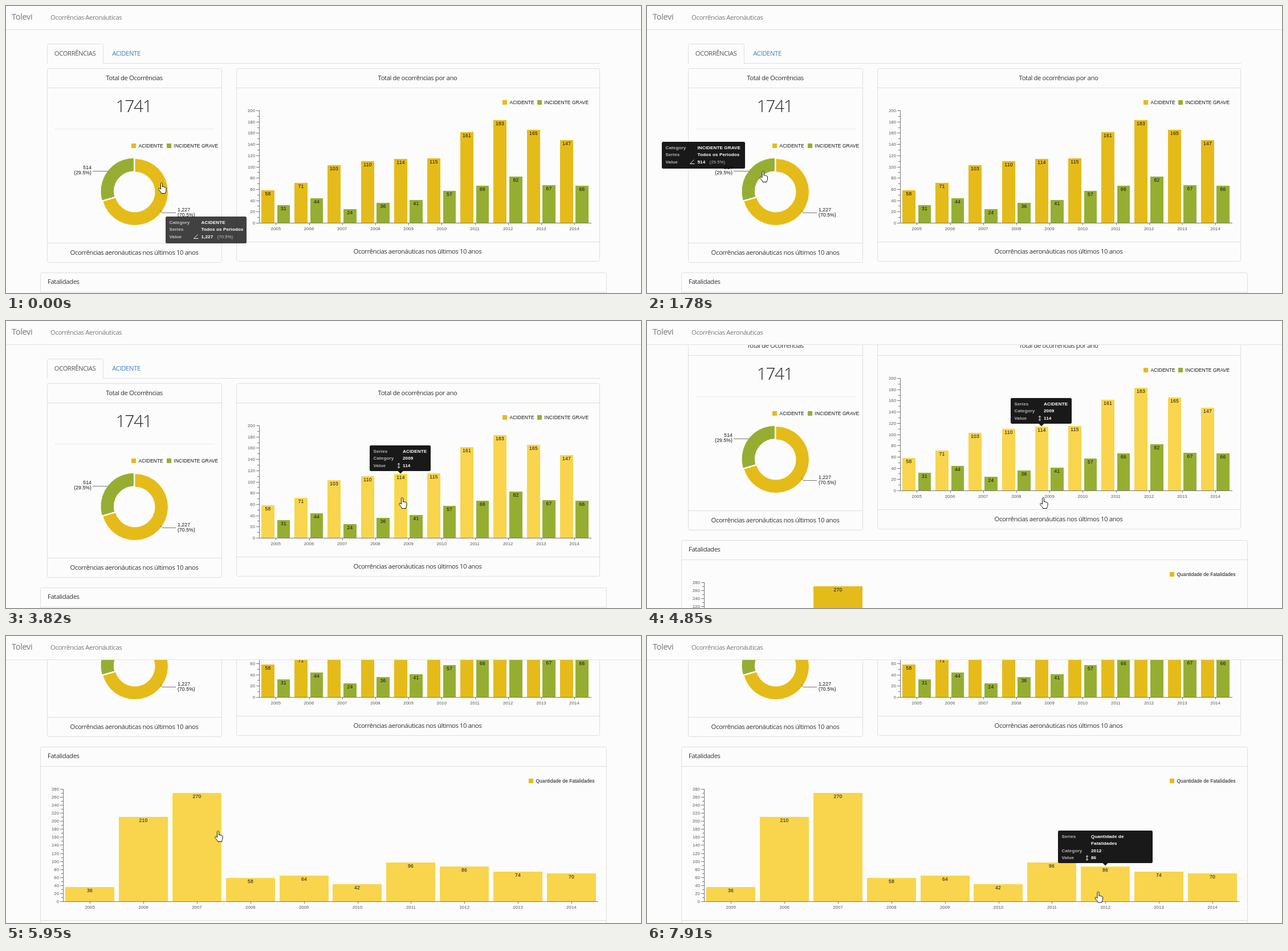
An HTML page with a canvas that plays this animation: 1114 by 503 pixels, repeating every 8 s.

```html
<!DOCTYPE html>
<html lang="pt">
<head>
<meta charset="utf-8">
<style>
html, body { margin: 0; width: 100%; height: 100%; overflow: hidden; background: #fcfcfc; }
canvas { display: block; }
</style>
</head>
<body>
<canvas id="stage" width="1114" height="503"></canvas>
<script>
const stage = document.getElementById('stage').getContext('2d');
const layer = new OffscreenCanvas(180, 70).getContext('2d');
let g = stage; // context the drawing helpers use

const LOOP = 8000, STEP = 120;
const UI = '"Open Sans", sans-serif', ARIAL = '"Liberation Sans", sans-serif';
const YELLOW = '#e5bb19', LIGHT = '#f8d54c', GREEN = '#95ae32', LINE = '#dedede', AXIS = '#777';
const TOP = -Math.PI / 2, SPLIT = TOP + Math.PI * 2 * .705;

const accidents = { left: 448, step: 58.2, width: 23, bottom: 380, scale: .985,
  values: [58, 71, 103, 110, 114, 115, 161, 183, 165, 147] };
const incidents = { ...accidents, left: 475.6, width: 22.6,
  values: [31, 44, 24, 36, 41, 57, 66, 82, 67, 66] };
const deaths = { left: 104.2, step: 93.85, width: 86, bottom: 738, scale: .7036,
  values: [36, 210, 270, 58, 64, 42, 96, 86, 74, 70] };

// Mouse moves: start time, number of steps, end point
const moves = [
  [1030, 4, 203.5, 289.5], [2680, 4, 707.5, 305], [3670, 2, 695, 309.5],
  [5690, 4, 350.5, 343.5], [7080, 1, 363, 350], [7230, 3, 791.5, 448]
];

// Progress 0..1 in hard steps, as in a screen capture
const steps = (t, start, n) => Math.min(n, Math.max(0, Math.floor((t - start) / STEP) + 1)) / n;
const easeOut = p => 1 - (1 - p) ** 2;
const mix = (a, b, p) => a + (b - a) * p;

const scrollAt = t => Math.round(273 * steps(t, 4850, 3) ** 1.084);

function mouseAt(t) {
  let x = 273, y = 309.5;
  for (const [start, n, toX, toY] of moves) {
    const p = easeOut(steps(t, start, n));
    x = mix(x, toX, p);
    y = mix(y, toY, p);
  }
  return [x, y];
}

function barRect({ values, left, step, width, bottom, scale }, i) {
  const x = Math.round(left + step * i), y = Math.round(bottom - values[i] * scale);
  return [x, y, Math.round(left + step * i + width) - x, bottom - y];
}

function isOverShape(x, y) {
  const r = Math.hypot(x - 226, y - 326);
  return r > 35 && r < 58 || [accidents, deaths].some(chart => chart.values.some((_, i) => {
    const [bx, by, w, h] = barRect(chart, i);
    return x >= bx && x <= bx + w && y >= by && y <= by + h;
  }));
}

function text(s, x, y, size, { color = '#111', align = 'left', font = ARIAL, weight = 400, gap = .1 } = {}) {
  g.font = `${weight} ${size}px ${font}`;
  g.letterSpacing = gap + 'px';
  g.fillStyle = color;
  g.textAlign = align;
  g.textBaseline = 'middle';
  g.fillText(s, x, y);
}
const label = (s, x, y, align = 'center', color = '#333') =>
  text(s, x, y, 11.3, { color, align, font: UI, gap: -.4 });

function rect(x, y, w, h, color) {
  g.fillStyle = color;
  g.fillRect(x, y, w, h);
}

function line(color, ...points) {
  g.strokeStyle = color;
  g.beginPath();
  points.forEach(p => g.lineTo(...p));
  g.stroke();
}

function box(x, y, w, h, radius, fill, stroke) {
  g.beginPath();
  g.roundRect(x, y, w, h, radius);
  if (fill) { g.fillStyle = fill; g.fill(); }
  if (stroke) { g.strokeStyle = stroke; g.stroke(); }
}

function panel(x, y, w, h, ...rules) {
  box(x + .5, y + .5, w, h, 3, null, LINE);
  rules.forEach(r => rect(x, r, w, 1, LINE));
}

function legend(name, x, y, color) {
  rect(x, y - 4, 8, 8, color);
  text(name, x + 12.5, y + .5, 8.4);
}

function axes({ values, left, step, width, bottom, scale }, x, right, max, center) {
  const top = Math.round(bottom - max * scale);
  rect(x, top, 1, bottom - top + 1, AXIS);
  rect(x, bottom, right - x, 1, AXIS);
  for (let v = 0; v <= max; v += 10) {
    const y = Math.round(bottom - v * scale), tick = v % 20 ? 3 : 5;
    rect(x - tick, y, tick, 1, AXIS);
    if (v % 20 == 0) text(v, x - 7, y + .5, 7.6, { align: 'right', color: '#555' });
  }
  values.forEach((_, i) => {
    const mid = center + step * i;
    rect(Math.round(mid), bottom, 1, 4, AXIS);
    text(2005 + i, mid, bottom + 10.5, 7.7, { align: 'center', color: '#555' });
  });
}

function bars(chart, color, hover) {
  chart.values.forEach((v, i) => {
    const [x, y, w, h] = barRect(chart, i);
    rect(x, y, w, h, color);
    if (i === hover) {
      g.strokeStyle = '#fae434';
      g.strokeRect(x + .5, y + .5, w - 1, h - 1);
    }
    text(v, x + w / 2, y + 6.3, 8.5, { align: 'center', gap: .25 });
  });
}

function slice(x, y, from, to, color) {
  g.beginPath();
  g.arc(x, y, 58.5, from, to);
  g.arc(x, y, 35, to, from, true);
  g.closePath();
  g.fillStyle = color;
  g.fill();
  g.strokeStyle = '#fff';
  g.stroke();
}

function donut() {
  slice(226, 326, TOP, SPLIT, YELLOW);
  slice(224.4, 324.8, SPLIT, TOP + Math.PI * 2, GREEN);
  line(AXIS, [152, 289.5], [178, 289.5], [181, 292.5]);
  line(AXIS, [270, 358], [274, 362.5], [298, 362.5]);
  text('514', 150, 284, 8.6, { align: 'right' });
  text('(29.5%)', 150, 293, 8.6, { align: 'right' });
  text('1,227', 301, 357.5, 8.6);
  text('(70.5%)', 301, 366.5, 8.6);
}

// Composed on its own layer so that it fades as one piece
function tooltip(x, y, w, h, opacity, rows, { arrow, share, valueX = 58 }) {
  if (opacity <= 0) return;
  g = layer;
  g.clearRect(0, 0, 180, 70);
  box(0, 0, w, h, 2.5, 'rgba(0,0,0,.9)');
  if (arrow) {
    g.beginPath();
    g.moveTo(arrow - 4.5, h);
    g.lineTo(arrow + 4.5, h);
    g.lineTo(arrow, h + 4.5);
    g.fill();
  }
  rows.forEach(([name, value], i) => {
    const rowY = 10.5 + i * 12.5;
    text(name, 6.5, rowY, 8.1, { weight: 700, color: '#b4b4b4' });
    text(value, valueX, rowY, 8.1, { weight: 700, color: '#fff' });
  });
  const iconX = valueX - 7, iconY = rows.length * 12.5 - 2;
  if (share) {
    line('#eee', [iconX + 1, iconY - 4], [iconX - 6, iconY + 3], [iconX + 2, iconY + 3]);
    text(share, g.measureText(rows.at(-1)[1]).width + valueX + 7.5, iconY, 7.6, { color: '#c0c0c0' });
  } else {
    line('#eee', [iconX, iconY - 4], [iconX, iconY + 4]);
    for (const d of [-1, 1])
      line('#eee', [iconX - 2, iconY + 2 * d], [iconX, iconY + 4.3 * d], [iconX + 2, iconY + 2 * d]);
  }
  g = stage;
  g.globalAlpha = opacity;
  g.drawImage(layer.canvas, Math.round(x), Math.round(y));
  g.globalAlpha = 1;
}

function tooltips(t) {
  const toGreen = easeOut(steps(t, 1420, 4)), leave = steps(t, 2680, 4) ** 2;
  const onGreen = t >= 1270 && t < 2680;
  const [name, value, share] = onGreen
    ? ['INCIDENTE GRAVE', '514', '(29.5%)']
    : ['ACIDENTE', '1,227', '(70.5%)'];
  tooltip(mix(mix(280, 26, toGreen), 161, leave), mix(mix(369, 238, toGreen), 307, leave),
    onGreen ? 146 : 142, 47, t < STEP ? .82 : 1 - steps(t, 2680, 5) ** 1.3,
    [['Category', name], ['Series', 'Todos os Periodos'], ['Value', value]], { share, valueX: 62.5 });

  tooltip(638, 218, 107, 45, t < 5260 ? steps(t, 2950, 5) : 0,
    [['Series', 'ACIDENTE'], ['Category', '2009'], ['Value', '114']], { arrow: 54 });

  const slide = easeOut(steps(t, 7500, 3)), i = slide ? 7 : 2;
  tooltip(mix(252, 721, slide), mix(485, 614, slide), 166, 57, steps(t, 6090, 4),
    [['Series', 'Quantidade de'], ['', 'Fatalidades'], ['Category', 2005 + i], ['Value', deaths.values[i]]],
    { arrow: 83 });
}

function page(t) {
  rect(72, 100, 970, 1, LINE);
  box(72.5, 66.5, 98, 38, [3, 3, 0, 0], '#fcfcfc', LINE);
  rect(70, 101, 103, 6, '#fcfcfc');
  label('OCORRÊNCIAS', 121, 84, 'center', '#555');
  label('ACIDENTE', 211, 84, 'center', '#3f7fc8');

  panel(72, 109, 306, 340, 143, 415);
  label('Total de Ocorrências', 225, 127);
  text('1741', 224, 178, 30, { align: 'center', font: UI, weight: 300, color: '#222', gap: -1.4 });
  rect(85, 215, 281, 1, '#e9e9e9');
  legend('ACIDENTE', 220, 245, YELLOW);
  legend('INCIDENTE GRAVE', 282, 245, GREEN);
  donut();
  label('Ocorrências aeronáuticas nos últimos 10 anos', 225, 433);

  const lit = t >= 2830 && t < 5260;
  panel(404, 109, 637, 338, 143, 413);
  label('Total de ocorrências por ano', 722, 127);
  legend('ACIDENTE', 871, 169, YELLOW);
  legend('INCIDENTE GRAVE', 932, 169, GREEN);
  bars(accidents, lit ? LIGHT : YELLOW, lit ? 4 : -1);
  bars(incidents, GREEN);
  axes(accidents, 444, 1027, 200, 473.3);
  label('Ocorrências aeronáuticas nos últimos 10 anos', 722, 431);

  const hoverYear = t < 5950 ? -1 : t < 7230 ? 2 : 7;
  panel(60, 467, 993, 400, 501, 771);
  label('Fatalidades', 73, 484, 'left');
  legend('Quantidade de Fatalidades', 917, 527, YELLOW);
  bars(deaths, hoverYear < 0 ? YELLOW : LIGHT, hoverYear);
  axes(deaths, 100, 1039, 280, 147.3);

  tooltips(t);
}

const HAND = new Path2D('M4.5 12V2.2C4.5.2 7.5.2 7.5 2.2V8.2C8 7.2 10 7.2 10.2 8.6 10.8 7.8 12.2 8 12.4 9.3 13 8.8 14 9.1 14 10.3V14C14 16 12.5 17 12.5 19.5H5.5C5.3 17 2.5 15.5.9 12.5 0 10.8 1.6 9.8 2.8 10.8Z');
const ARROW = new Path2D('M0 0V14L3.2 11 5.4 16 7.6 15 5.6 10.2H10Z');

function cursor(t) {
  const [x, y] = mouseAt(t);
  // The pointer only updates once the mouse moves again after scrolling
  const hand = isOverShape(x, y + (t < 5260 ? 0 : scrollAt(t)));
  const shape = hand ? HAND : ARROW;
  g.save();
  g.translate(hand ? x - 6 : x, hand ? y - .5 : y);
  g.fillStyle = '#fff';
  g.strokeStyle = '#111';
  g.fill(shape);
  g.stroke(shape);
  g.restore();
}

function draw(t) {
  rect(0, 0, 1114, 503, '#fcfcfc');
  g.save();
  g.translate(0, -scrollAt(t));
  page(t);
  g.restore();

  rect(0, 0, 1114, 41, '#fcfcfc');
  rect(0, 41, 1114, 1, '#e2e2e2');
  text('Tolevi', 10, 20.5, 14.5, { font: UI, color: '#777', gap: -.3 });
  label('Ocorrências Aeronáuticas', 78, 21, 'left', '#777');
  cursor(t);
}

function tick() {
  draw(performance.now() % LOOP);
  requestAnimationFrame(tick);
}
tick();
</script>
</body>
</html>
```
